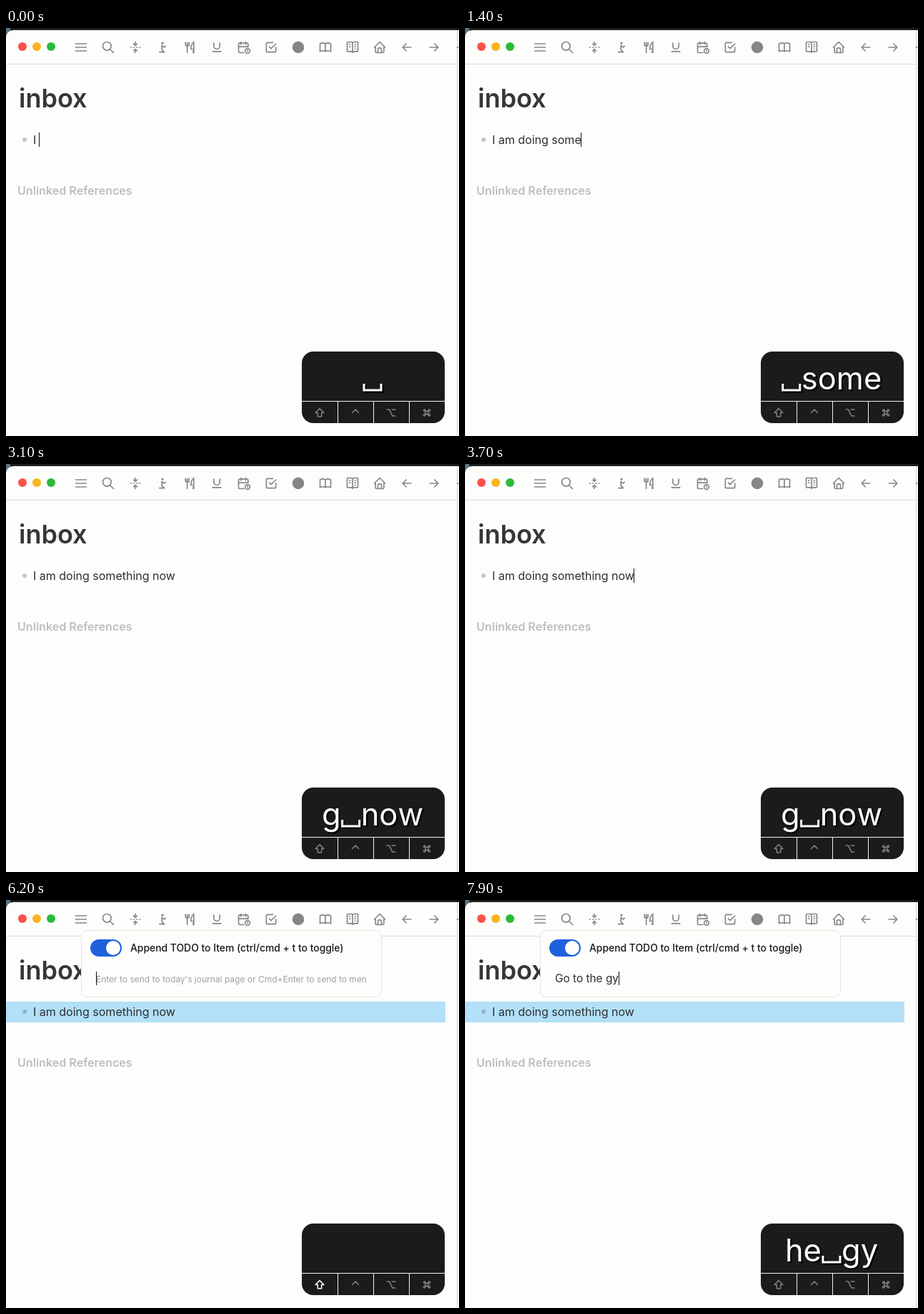
An HTML page with a canvas for the animation above (8000 ms loop, 634x570 px).

```html
<!DOCTYPE html>
<html lang="en">
<head>
<meta charset="utf-8">
<title>Inbox quick capture</title>
<style>
html, body { margin: 0; width: 100%; height: 100%; overflow: hidden; background: #fdfdfb; }
canvas { display: block; }
</style>
</head>
<body>
<canvas id="stage" width="634" height="570"></canvas>
<script>
const c = document.getElementById('stage').getContext('2d');
const LOOP = 8000;
const PAPER = '#fdfdfb', INK = '#2e2e30', ICON = '#868686', EDGE = '#e2e2de', CARET = '#111';
const NOTE = 'I am doing something now', TODO = 'Go to the gym';
const ESC = '\u238b';

// Toolbar icons on a 24-unit grid; null is a plain disc
const TOOLS = [
  'M3 6h18M3 12h18M3 18h18',
  'M3 10a7 7 0 1 0 14 0a7 7 0 1 0-14 0M21 21l-6-6',
  'M12 3v6l3-3m-6 0l3 3M12 21v-6l3 3m-6 0l3-3M4 12h1M9 12h1M14 12h1M19 12h1',
  'M11 5a1 1 0 1 0 2 0a1 1 0 1 0-2 0M7 20h8l-4-4v-7l4 3 2-2',
  'M19 3v12h-5c0-4 .2-7.4 5-12zM19 15v6h-1v-3M8 4v17M5 4v3a3 3 0 1 0 6 0v-3',
  'M7 5v5a5 5 0 0 0 10 0v-5M5 19h14',
  'M12 21h-7a2 2 0 0 1-2-2v-12a2 2 0 0 1 2-2h12a2 2 0 0 1 2 2v4M14 18a4 4 0 1 0 8 0a4 4 0 1 0-8 0M15 3v4M7 3v4M3 11h16M18 16.5v1.5l.5 .5',
  'M9 11l3 3 8-8M20 12v6a2 2 0 0 1-2 2h-12a2 2 0 0 1-2-2v-12a2 2 0 0 1 2-2h9',
  null,
  'M3 19a9 9 0 0 1 9 0a9 9 0 0 1 9 0M3 6a9 9 0 0 1 9 0a9 9 0 0 1 9 0M3 6v13M12 6v13M21 6v13',
  'M10 19h-6a1 1 0 0 1-1-1v-14a1 1 0 0 1 1-1h6a2 2 0 0 1 2 2a2 2 0 0 1 2-2h6a1 1 0 0 1 1 1v14a1 1 0 0 1-1 1h-6a2 2 0 0 0-2 2a2 2 0 0 0-2-2zM12 5v16M7 7h1M7 11h1M16 7h1M16 11h1M16 15h1',
  'M5 12h-2l9-9 9 9h-2M5 12v7a2 2 0 0 0 2 2h10a2 2 0 0 0 2-2v-7M9 21v-6a2 2 0 0 1 2-2h2a2 2 0 0 1 2 2v6',
  'M5 12h14M5 12l6 6M5 12l6-6',
  'M5 12h14M19 12l-6 6M19 12l-6-6'
];
const MODIFIERS = [
  'M12 3l9 9h-5v8h-8v-8h-5z',
  'M5 12l7-7 7 7',
  'M3 5h5l7 14h6M14 5h7',
  'M7 9a2 2 0 1 1 2-2v10a2 2 0 1 1-2-2h10a2 2 0 1 1-2 2v-10a2 2 0 1 1 2 2h-10'
];

function rect(x, y, w, h, color) {
  c.fillStyle = color;
  c.fillRect(x, y, w, h);
}

function rounded(x, y, w, h, r, color, border) {
  c.beginPath();
  c.roundRect(x, y, w, h, r);
  c.fillStyle = color;
  c.fill();
  if (border) {
    c.strokeStyle = border;
    c.lineWidth = 1;
    c.stroke();
  }
}

function disc(x, y, r, color) {
  c.beginPath();
  c.arc(x, y, r, 0, 7);
  c.fillStyle = color;
  c.fill();
}

// Draws text and returns the x where it ends
function text(s, x, y, size, weight, color) {
  c.font = `${weight} ${size}px Inter, sans-serif`;
  c.fillStyle = color;
  c.fillText(s, x, y);
  return x + c.measureText(s).width;
}

function icon(path, x, y, scale, color, width = 2) {
  c.save();
  c.translate(x, y);
  c.scale(scale, scale);
  c.translate(-12, -12);
  c.lineWidth = width;
  c.lineCap = c.lineJoin = 'round';
  c.strokeStyle = color;
  c.stroke(new Path2D(path));
  c.restore();
}

function drawWindow() {
  rect(0, 0, 634, 570, '#5d7482');
  rect(6, 0, 628, 4, '#1c1c1c');
  rounded(0, 3, 640, 580, [10, 0, 0, 0], PAPER);
  rect(0, 50, 631, 1, '#d9d9e4');
  rect(631, 3, 1, 567, '#d6d6d2');
  rect(632, 55, 2, 1, EDGE);
  rect(631, 26, 2, 2, ICON);
  ['#fa504a', '#fab41e', '#2aba3a'].forEach((color, i) => disc(23 + 20 * i, 26, 6, color));
  TOOLS.forEach((path, i) => {
    const x = 105 + 38 * i;
    if (path) icon(path, x, 27, 0.833, ICON);
    else disc(x, 27, 8.3, ICON);
  });
}

function drawPage(t, count) {
  const selected = t >= 3900;
  if (selected) rect(0, 142, 615, 29, '#b2e0f9');
  text('inbox', 18, 111, 36, 600, '#363638');
  disc(26, 156, 3, selected ? '#8fb6c8' : '#c6c6c6');
  const end = text(NOTE.slice(0, count), 38, 162, 16, 400, INK);
  const blinkOn = t < 2900 || t >= 3400;
  if (!selected && blinkOn) rect(Math.floor(end), 146, 1, 20, CARET);
  text('Unlinked References', 16, 233, 16.1, 600, '#bebebe');
}

function drawCapture(t, count) {
  rounded(105.5, 42.5, 420, 93, 8, PAPER, EDGE);
  rounded(118, 55, 44, 24, 12, '#2060de');
  disc(150, 67, 10, '#fff');
  text('Append TODO to Item (ctrl/cmd + t to toggle)', 174, 72, 13.9, 500, '#17171a');
  let end = 126;
  if (count) end = text(TODO.slice(0, count), 126, 115, 15.4, 400, INK);
  else text("Enter to send to today's journal page or Cmd+Enter to send to men", 126, 115, 12, 400, '#9ea0a6');
  const blinkOn = t >= 4800 && (t - 4800) % 1000 < 500;
  if (count || blinkOn) rect(Math.floor(end), 100, 1, 19, CARET);
}

function keyWidth(key) {
  if (key === ' ') return 28;
  if (key === ESC) return 44;
  return c.measureText(key).width;
}

function drawKey(key, x, y) {
  if (key !== ' ' && key !== ESC) return c.fillText(key, x, y);
  c.beginPath();
  if (key === ' ') {
    c.moveTo(x + 2, y - 8);
    c.lineTo(x + 2, y + 1);
    c.lineTo(x + 26, y + 1);
    c.lineTo(x + 26, y - 8);
  } else {
    c.arc(x + 22, y - 16, 17.5, -1.75, 3.35);
    c.moveTo(x + 22, y - 16);
    c.lineTo(x + 5, y - 33);
    c.moveTo(x + 4, y - 23);
    c.lineTo(x + 4, y - 34);
    c.lineTo(x + 15, y - 34);
  }
  c.stroke();
}

function drawKeys(keys, shift) {
  rounded(414, 452, 200, 100, 16, '#1b1b1d');
  rect(414, 521, 200, 1, '#f2f2f2');
  for (const x of [464, 514, 564]) rect(x, 522, 1, 30, '#f2f2f2');
  MODIFIERS.forEach((path, i) =>
    icon(path, 439 + 50 * i, 537.5, 0.65, shift && !i ? '#fff' : '#828282', 2.3));

  c.save();
  c.font = '400 43.5px Inter, sans-serif';
  c.fillStyle = c.strokeStyle = '#fff';
  c.lineWidth = 3;
  c.shadowColor = '#000';
  c.shadowOffsetX = c.shadowOffsetY = 2;
  c.shadowBlur = 1;
  const list = [...keys];
  let x = 513 - list.reduce((sum, key) => sum + keyWidth(key), 0) / 2;
  for (const key of list) {
    drawKey(key, x, 505);
    x += keyWidth(key);
  }
  c.restore();
}

function pressedKeys(t, noted, todo) {
  if (t < 3900) return NOTE.slice(Math.max(1, noted - 5), noted);
  if (t < 4200) return 'now' + ESC;
  if (t < 4400) return 'now' + ESC + 'm';
  if (t < 5500) return 'now' + ESC + 'mt';
  return TODO.slice(Math.max(0, todo - (todo < 8 ? 4 : 5)), todo);
}

function todoCount(t) {
  if (t < 6200) return 0;
  return t < 6900 ? (t - 6200) / 100 : 7 + Math.floor((t - 6900) / 200);
}

function draw(now) {
  const t = Math.floor(now % LOOP / 100) * 100;
  const noted = Math.min(NOTE.length, 2 + Math.floor(t / 107));
  const todo = todoCount(t);
  drawWindow();
  drawPage(t, noted);
  if (t >= 4400) drawCapture(t, todo);
  drawKeys(pressedKeys(t, noted, todo), t >= 6100 && t < 6400);
}

const start = performance.now();
function tick() {
  draw(performance.now() - start);
  requestAnimationFrame(tick);
}
tick();
</script>
</body>
</html>
```
